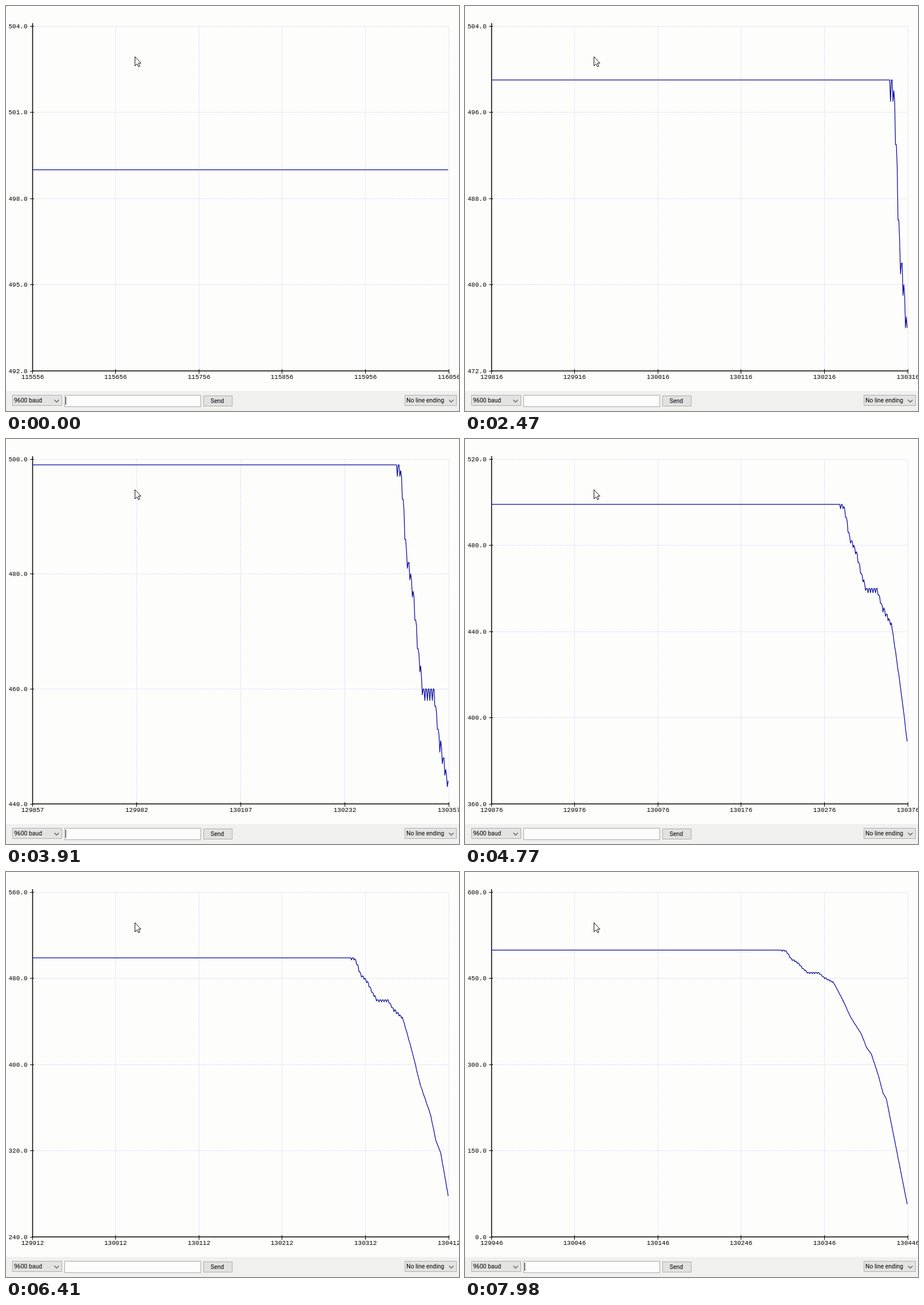
An HTML page with a canvas that plays this animation: 792x707 px, repeating every 8 s.

```html
<!DOCTYPE html>
<html lang="en">
<head>
<meta charset="utf-8">
<title>Serial plotter</title>
<style>
  html, body { margin: 0; width: 100%; height: 100%; overflow: hidden; background: #fdfdfc; }
  canvas { display: block; }
</style>
</head>
<body>
<canvas id="stage" width="792" height="707"></canvas>
<script>
const ctx = document.getElementById('stage').getContext('2d');
const LOOP = 8000;
const TICK = 10;
const PLOT = { left: 46, right: 774, top: 35, bottom: 637 };
const SAMPLES = 500;
const GRID = '#dfdff6';
const UI_FONT = '10.4px Roboto, sans-serif';
const LABEL_FONT = '11px "Liberation Mono", monospace';

// [time in ms, index of the leftmost sample]: a fast feed, then a slow one
const SCROLL = [[0, 115556], [1543, 129793], [2470, 129816], [3910, 129857], [7980, 129946]];

// [samples since FALL_START, reading]: where the falling slope bends
const FALL_START = 130290;
const FALL = [
  [8, 499], [10, 497], [16, 484], [21, 480], [25, 476], [30, 467], [36, 460],
  [49, 460], [55, 452], [66, 444], [76, 417], [88, 380], [100, 353], [106, 330],
  [112, 318], [120, 283], [126, 250], [130, 240], [136, 197], [156, 50]
];

// Piecewise linear; the last segment continues past its end.
function interpolate(points, x) {
  let k = 0;
  while (k < points.length - 2 && x >= points[k + 1][0]) k++;
  const [[x0, y0], [x1, y1]] = [points[k], points[k + 1]];
  return y0 + (y1 - y0) * (x - x0) / (x1 - x0);
}

function sampleAt(index) {
  const i = index - FALL_START;
  const dip = i > 2 && i < 66 && i % 3 === 2 ? 2 : 0;
  return Math.round(interpolate(FALL, Math.max(i, FALL[0][0])) - dip);
}

// Smallest round step that covers the values with at most four intervals.
function yScale(values) {
  let min = Math.min(...values), max = Math.max(...values);
  if (max - min < 10) {
    const mid = (min + max) / 2;
    min = mid - 5;
    max = mid + 5;
  }
  for (let unit = 1; ; unit *= 10) {
    for (const m of [1, 1.5, 2, 3, 4, 5, 6, 8]) {
      const step = m * unit;
      const low = Math.floor(min / step) * step;
      const count = Math.ceil(max / step) - low / step;
      if (count <= 4) return { low, step, count };
    }
  }
}

const crisp = v => Math.floor(v) + 0.5;

function line(x0, y0, x1, y1, color, width = 1, dash = []) {
  ctx.strokeStyle = color;
  ctx.lineWidth = width;
  ctx.setLineDash(dash);
  ctx.beginPath();
  ctx.moveTo(x0, y0);
  ctx.lineTo(x1, y1);
  ctx.stroke();
  ctx.setLineDash([]);
}

function text(str, x, y, font, align = 'left') {
  ctx.font = font;
  ctx.textAlign = align;
  ctx.fillStyle = '#000';
  ctx.fillText(str, x, y);
}

function box(x, y, w, h, fill, border) {
  ctx.fillStyle = fill;
  ctx.fillRect(x, y, w, h);
  ctx.strokeStyle = border;
  ctx.lineWidth = 1;
  ctx.strokeRect(x + 0.5, y + 0.5, w - 1, h - 1);
}

function drawAxes(start, scale) {
  const { left, right, top, bottom } = PLOT;
  const rows = scale.count, cols = rows + 1;
  const rowY = i => crisp(bottom - (bottom - top) * i / rows);
  const colX = i => crisp(left + (right - left) * i / cols);

  for (let i = 1; i <= rows; i++) line(left, rowY(i), right, rowY(i), GRID, 1, [3, 1]);
  for (let i = 1; i <= cols; i++) line(colX(i), top, colX(i), bottom, GRID, 1, [3, 1]);

  line(46.5, 30, 46.5, bottom + 1, '#000', 1.5);
  line(left, bottom, right + 1, bottom, '#000', 1.5);

  for (let i = 0; i <= rows; i++) {
    line(42, rowY(i), 49, rowY(i), '#000');
    text((scale.low + i * scale.step).toFixed(1), 37.5, rowY(i) + 3.5, LABEL_FONT, 'right');
  }
  for (let i = 0; i <= cols; i++) {
    line(colX(i), 634, colX(i), 642, '#000');
    text(String(start + i * SAMPLES / cols), colX(i), 651, LABEL_FONT, 'center');
  }
}

function drawSignal(values, scale) {
  const { left, right, top, bottom } = PLOT;
  const perUnit = (bottom - top) / (scale.count * scale.step);
  ctx.strokeStyle = '#0808a0';
  ctx.lineWidth = 1.25;
  ctx.lineJoin = 'round';
  ctx.beginPath();
  values.forEach((v, i) =>
    ctx.lineTo(left + 0.5 + i * (right - left) / SAMPLES, bottom - (v - scale.low) * perUnit));
  ctx.stroke();
}

function chevron(x, y) {
  ctx.strokeStyle = '#555';
  ctx.lineWidth = 1.2;
  ctx.beginPath();
  ctx.moveTo(x - 4, y - 2);
  ctx.lineTo(x, y + 2);
  ctx.lineTo(x + 4, y - 2);
  ctx.stroke();
}

function dropdown(x, w, label) {
  box(x, 679, w, 19, '#e3e3e3', '#adadad');
  text(label, x + 3, 692, UI_FONT);
  chevron(x + w - 9.5, 689.5);
}

function drawToolbar(time) {
  ctx.fillStyle = '#f0f0ee';
  ctx.fillRect(0, 672, 792, 35);
  dropdown(11, 87, '9600 baud');
  box(102, 679, 239, 21, '#fdfdfd', '#a8a8a8');
  const caretOn = (time + 145) % 1000 < 500;
  if (caretOn) line(104.5, 682, 104.5, 696, '#000');
  box(345, 680, 51, 19, '#e1e1e1', '#adadad');
  text('Send', 369.5, 693, UI_FONT, 'center');
  dropdown(697, 91, 'No line ending');
}

const pointer = new Path2D('M225.5 88.5V104.5L229.2 101L231.7 106L234 105L231.6 99.8H236Z');

function drawPointer() {
  ctx.fillStyle = '#fff';
  ctx.fill(pointer);
  ctx.strokeStyle = '#111';
  ctx.lineWidth = 1;
  ctx.stroke(pointer);
}

function draw() {
  const time = Math.floor(performance.now() % LOOP / TICK) * TICK;
  const start = Math.ceil(interpolate(SCROLL, time));
  const values = Array.from({ length: SAMPLES }, (_, i) => sampleAt(start + i));
  const scale = yScale(values);

  ctx.fillStyle = '#fdfdfc';
  ctx.fillRect(0, 0, 792, 707);
  drawAxes(start, scale);
  drawSignal(values, scale);
  drawToolbar(time);
  drawPointer();
  requestAnimationFrame(draw);
}
requestAnimationFrame(draw);
</script>
</body>
</html>
```
